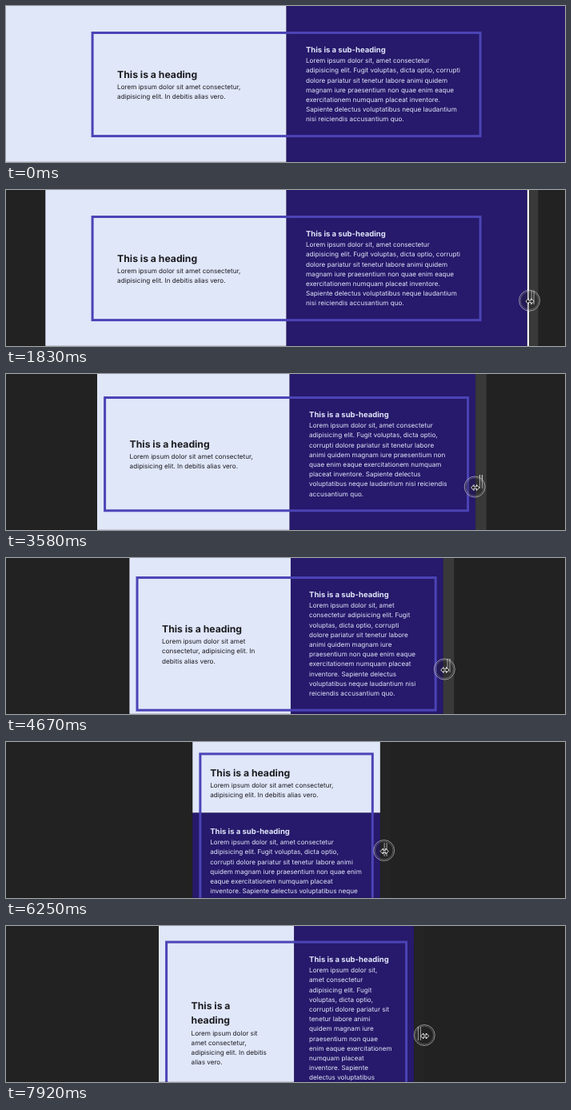
Animation, 699 px wide and 195 px high, one loop 8 s. Source, as an HTML page:

```html
<!DOCTYPE html>
<html lang="en">
<head>
<meta charset="utf-8">
<title>Responsive split layout</title>
<style>
  html, body { margin: 0; width: 100%; height: 100%; overflow: hidden; background: #222; }
  #stage {
    position: relative; width: 699px; height: 195px; overflow: hidden;
    font: 400 8.13px/1.5 Inter, sans-serif; text-rendering: geometricPrecision;
  }
  #stage > * { position: absolute; left: 0; top: 0; }
  h2, h3, p { margin: 0; }
  h2 { font-size: 1.5em; }
  h3 { font-size: 1.17em; position: relative; top: .7px; }
  #intro { color: #1c1c20; }
  #detail { color: #e0e7f9; }
</style>
</head>
<body>
<div id="stage">
  <svg width="699" height="195">
    <rect id="light" fill="#e0e7f9"/>
    <rect id="dark" fill="#27196b"/>
    <rect id="frame" fill="none" stroke="#4b44b6" stroke-width="3"/>
  </svg>
  <div id="intro">
    <h2>This is a heading</h2>
    <p>Lorem ipsum dolor sit amet consectetur, adipisicing elit. In debitis alias vero.</p>
  </div>
  <div id="detail">
    <h3>This is a sub-heading</h3>
    <p>Lorem ipsum dolor sit, amet consectetur adipisicing elit. Fugit voluptas, dicta optio, corrupti dolore pariatur sit tenetur labore animi quidem magnam iure praesentium non quae enim eaque exercitationem numquam placeat inventore. Sapiente delectus voluptatibus neque laudantium nisi reiciendis accusantium quo.</p>
  </div>
  <svg width="699" height="195">
    <rect y="194" width="699" height="1" fill-opacity=".13"/>
    <g id="handle">
      <rect id="strip" width="13.5" height="195"/>
      <rect id="flash" width="2" height="195" fill="#fff"/>
      <path d="M5.2 126V143M8.2 126V143" stroke="#ddd"/>
    </g>
    <g id="cursor">
      <circle r="13" fill="#222" fill-opacity=".3" stroke="#fff" stroke-opacity=".65" stroke-width=".8"/>
      <circle r="11.3" fill="none" stroke="#fff" stroke-opacity=".35" stroke-width=".7"/>
      <path transform="translate(.5 1)" d="M-5 0L-1.7-3.5V-1.1H1.7V-3.5L5 0L1.7 3.5V1.1H-1.7V3.5Z"
            fill="#151515" stroke="#fff" stroke-width=".9" stroke-linejoin="round"/>
    </g>
  </svg>
</div>
<script>
const LOOP = 8000, FPS = 12, HEIGHT = 195, CENTER = 350.6;
const MAX_BOX = 488, BREAKPOINT = 280, MARGIN = 8.1, GUTTER = 24.4, PAD = 16.26, BORDER = 3;
const CURSOR_IN = 3, DIM_AT = 60, FLASH = [21, 23];

// The drag: page inset, cursor distance from the page edge, cursor height
const DRAG = [
  { step: 6, inset: 0, lead: 5.5, y: 136 },
  { step: 43, inset: 114, lead: -1, y: 141 },
  { step: 56, inset: 154.4, lead: 1.5, y: 139 },
  { step: 65, inset: 227.4, lead: 4.5, y: 136 },
  { step: 68, inset: 227.4, lead: 4.5, y: 136 },
  { step: 83, inset: 240, lead: 5, y: 135 },
  { step: 95, inset: 191, lead: 13, y: 136.5, ease: 1.6 },
];

const [light, dark, frame, intro, detail, handle, strip, flash, cursor] =
  ['light', 'dark', 'frame', 'intro', 'detail', 'handle', 'strip', 'flash', 'cursor']
    .map(id => document.getElementById(id));

function pose(step) {
  const i = Math.max(1, DRAG.findIndex(key => key.step >= step));
  const a = DRAG[i - 1], b = DRAG[i];
  const p = Math.max(0, (step - a.step) / (b.step - a.step)) ** (b.ease || 1);
  const mix = name => a[name] + (b[name] - a[name]) * p;
  return { inset: mix('inset'), lead: mix('lead'), y: mix('y') };
}

function setRect(node, x, y, width, height) {
  for (const [name, value] of Object.entries({ x, y, width, height })) node.setAttribute(name, value);
}

function setFrame(x, y, w, h) {
  setRect(frame, x + BORDER / 2, y + BORDER / 2, w - BORDER, h - BORDER);
}

const heightOf = node => node.getBoundingClientRect().height;
const setWidth = (node, w) => { node.style.width = w + 'px'; };
const moveText = (node, x, y) => { node.style.transform = `translate(${x}px,${y}px)`; };
const show = (node, on) => { node.style.display = on ? '' : 'none'; };

function layout(left, right) {
  const width = right - left;
  const boxW = Math.min(MAX_BOX, width - 2 * MARGIN);
  const boxL = CENTER - boxW / 2, boxR = boxL + boxW;
  const top = Math.min(32, width * .0613 - 1);
  const gutter = Math.min(GUTTER, width * .0588);

  if (width < BREAKPOINT) {
    const x = boxL + gutter, textW = boxW - 2 * gutter - 1;
    setWidth(intro, textW);
    setWidth(detail, textW);
    const split = top + heightOf(intro) + 2 * PAD;
    moveText(intro, x, top + PAD);
    moveText(detail, x, split + PAD);
    setRect(light, left, 0, width, split);
    setRect(dark, left, split, width, HEIGHT - split);
    setFrame(boxL, top, boxW, split - top + heightOf(detail) + 2 * PAD);
    return;
  }

  // A narrower gutter pushes the split outwards, so the detail text stays put
  const split = CENTER + Math.min(MARGIN / 2, MAX_BOX - boxW) + GUTTER - gutter;
  const introX = boxL + 2 * PAD, detailX = split + gutter;
  setWidth(intro, split - 31 - introX);
  setWidth(detail, boxR - gutter + 1 - detailX);
  const boxH = heightOf(detail) + 2 * PAD;
  moveText(intro, introX, top + (boxH - heightOf(intro)) / 2);
  moveText(detail, detailX, top + PAD);
  setRect(light, left, 0, split - left, HEIGHT);
  setRect(dark, split, 0, right - split, HEIGHT);
  setFrame(boxL, top, boxW, boxH);
}

function draw(time) {
  const step = Math.floor((time % LOOP + 5) * FPS / 1000) % (LOOP * FPS / 1000);
  const { inset, lead, y } = pose(step);
  const right = 2 * CENTER - inset;
  layout(inset, right);

  handle.setAttribute('transform', `translate(${right} 0)`);
  strip.setAttribute('fill', step < DIM_AT ? '#393939' : '#242424');
  show(flash, step >= FLASH[0] && step <= FLASH[1]);
  show(cursor, step >= CURSOR_IN);
  cursor.setAttribute('transform', `translate(${right + lead} ${y})`);
}

function tick() {
  draw(performance.now());
  requestAnimationFrame(tick);
}
tick();
</script>
</body>
</html>
```
